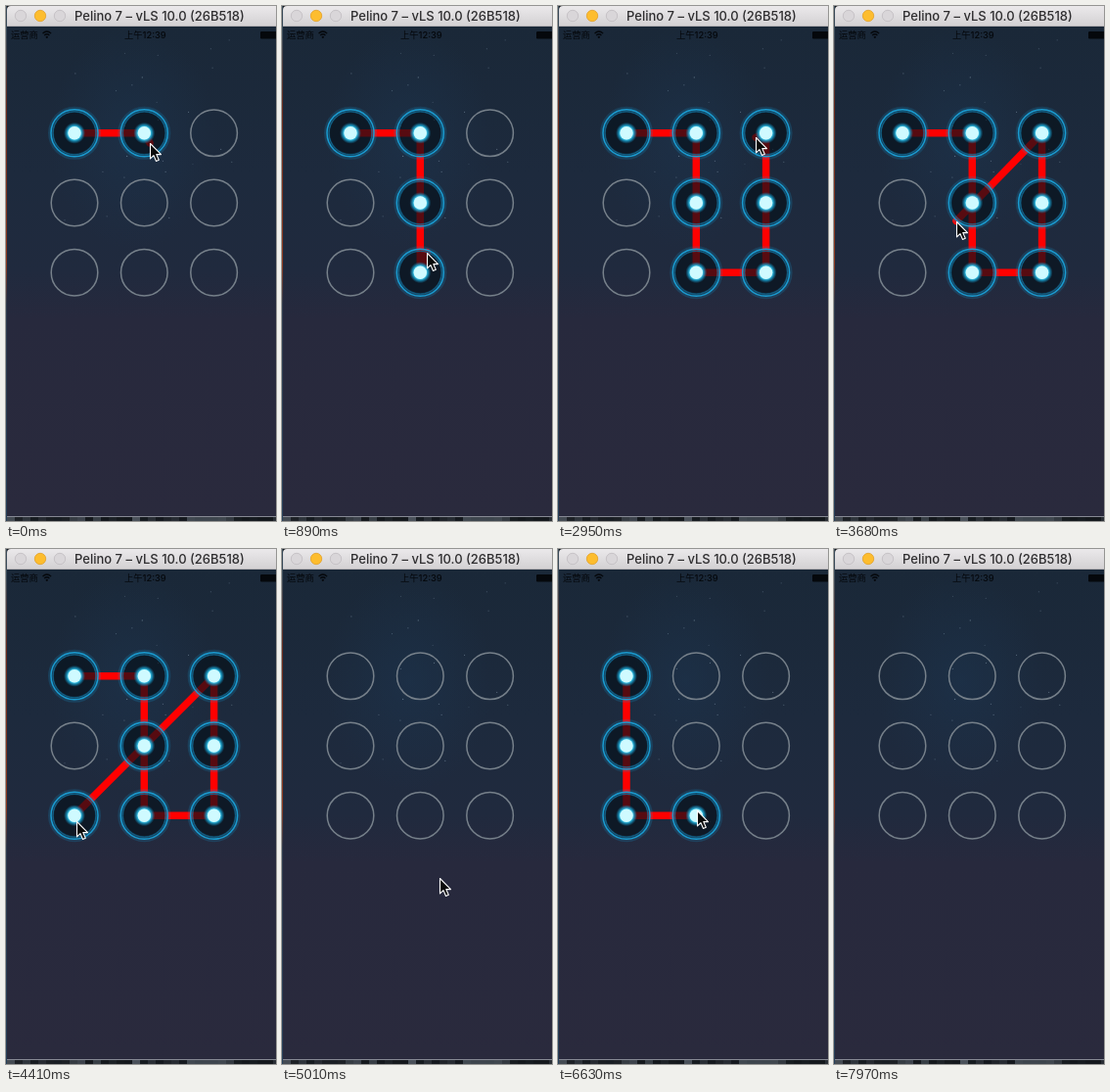
An HTML page that plays this animation: 276x526 px, repeating every 8520 ms.

```html
<!DOCTYPE html>
<html lang="zh">
<head>
<meta charset="utf-8">
<title>Pattern lock</title>
<style>
  html, body { margin: 0; width: 100%; height: 100%; overflow: hidden; background: #2a2a3d; }
  svg { display: block; width: 100%; height: 100%; }
  .title { font: 500 13px Inter, sans-serif; fill: #2e2d2f; }
  .status { font: 500 9.3px Inter, "Noto Sans CJK SC", "Noto Sans CJK", sans-serif; fill: #05080c; }
  .idle { fill: none; stroke: #76808a; stroke-width: 1.5; }
  .trail { fill: none; stroke: #f00; stroke-width: 7.5; stroke-linecap: round; stroke-linejoin: round; }
</style>
</head>
<body>
<svg viewBox="0 0 276 526" preserveAspectRatio="none">
  <defs>
    <linearGradient id="sky" x2="0" y2="1">
      <stop offset="0" stop-color="#1a2838"/>
      <stop offset=".3" stop-color="#1d2a3d"/>
      <stop offset=".5" stop-color="#202a3e"/>
      <stop offset=".6" stop-color="#27293d"/>
      <stop offset="1" stop-color="#2a2a3d"/>
    </linearGradient>
    <radialGradient id="haze">
      <stop offset="0" stop-color="#1c344e" stop-opacity=".55"/>
      <stop offset="1" stop-color="#1c344e" stop-opacity="0"/>
    </radialGradient>
    <linearGradient id="bar" x2="0" y2="1">
      <stop offset="0" stop-color="#ebe9eb"/>
      <stop offset="1" stop-color="#d2d0d2"/>
    </linearGradient>
    <linearGradient id="desk" x2="0" y2="1">
      <stop offset=".05" stop-color="#3a4c5a"/>
      <stop offset=".2" stop-color="#6a2a1c"/>
      <stop offset=".5" stop-color="#8e3a20"/>
      <stop offset=".58" stop-color="#2f3c4e"/>
      <stop offset="1" stop-color="#26405a"/>
    </linearGradient>
    <radialGradient id="glow">
      <stop offset=".58" stop-color="#45d4f6"/>
      <stop offset=".75" stop-color="#1a9fcc" stop-opacity=".75"/>
      <stop offset="1" stop-color="#1080b0" stop-opacity="0"/>
    </radialGradient>
    <g id="lit">
      <circle r="24" fill="#0b2a3c" fill-opacity=".4"/>
      <circle r="21.2" fill="#03060a" fill-opacity=".45"/>
      <circle r="24" fill="none" stroke="#128fc4" stroke-width="6" stroke-opacity=".22"/>
      <circle r="22" fill="none" stroke="#10648a"/>
      <circle r="24" fill="none" stroke="#1a9bd0" stroke-width="1.5"/>
      <circle r="11" fill="url(#glow)"/>
      <circle r="6.7" fill="#cffaff"/>
    </g>
  </defs>

  <rect width="276" height="526" fill="#14181d"/>
  <rect width="1" height="526" fill="url(#desk)"/>
  <rect x="1" y="21" width="275" height="500" fill="url(#sky)"/>
  <ellipse cx="130" cy="135" rx="85" ry="114" fill="url(#haze)"/>
  <g id="stars" fill="#8fa5b8"></g>
  <rect x="1" y="521" width="275" height="1" fill="#868994"/>
  <g id="desktop" fill="#59616b"></g>

  <path d="M1 21V4Q1 0 5 0H276V21Z" fill="url(#bar)"/>
  <rect x="1" y="20" width="275" height="1" fill="#b2b0b3"/>
  <g stroke-width=".8" fill="#d9d6d9" stroke="#c0bdc0">
    <circle cx="15" cy="10" r="5.7"/>
    <circle cx="35" cy="10" r="5.7" fill="#fdbd2e" stroke="#e2a129"/>
    <circle cx="55" cy="10" r="5.7"/>
  </g>
  <text class="title" x="70" y="15">Pelino 7 – vLS 10.0 (26B518)</text>

  <text class="status" x="5" y="33">运营商</text>
  <g fill="none" stroke="#05080c" stroke-width="1.3">
    <path d="M37.5 28Q41.8 24 46.1 28M39.2 30Q41.8 27.6 44.4 30"/>
    <circle cx="41.8" cy="31.8" r=".5"/>
  </g>
  <text class="status" x="121" y="33">上午12:39</text>
  <rect x="260" y="26" width="18" height="7.5" rx="1.2" fill="#05080c"/>

  <path id="trail" class="trail"/>
  <g id="nodes"></g>
  <path id="pointer" d="M.5 .5V15.9L4 12.6L6.5 18.5L9.3 17.3L6.8 11.6H11.5Z"
        fill="#0a0a0a" stroke="#fff" stroke-width="1.1" stroke-linejoin="round"/>
</svg>

<script>
const LOOP = 8520, STEP = 147, HIT = 24;
const byId = id => document.getElementById(id);
const cell = (col, row) => ({ x: 70 + 71.3 * col, y: 129.8 + 71.2 * row });
const ease = k => k * k * (3 - 2 * k);

let seed = 7;
const random = () => (seed = seed * 16807 % 2147483647) / 2147483647;

function add(parent, tag, attrs) {
  const el = document.createElementNS('http://www.w3.org/2000/svg', tag);
  for (const key in attrs) el.setAttribute(key, attrs[key]);
  return parent.appendChild(el);
}

for (let i = 0; i < 24; i++) {
  add(byId('stars'), 'circle', {
    cx: 60 + 185 * random(), cy: 30 + 210 * random() ** 1.3, r: .6, opacity: .2 + .4 * random()
  });
}
for (let x = 1; x < 276; x += 8) {
  add(byId('desktop'), 'rect', { x, y: 522, width: 8, height: 4, opacity: .8 * random() ** 2 });
}

const nodes = Array.from({ length: 9 }, (_, i) => {
  const { x, y } = cell(i % 3, Math.floor(i / 3));
  return {
    x, y,
    idle: add(byId('nodes'), 'circle', { class: 'idle', cx: x, cy: y, r: 23.8 }),
    lit: add(byId('nodes'), 'use', { href: '#lit', x, y })
  };
});

// Pointer turning points as [step, column, row] in units of the node grid.
const gestures = [
  { start: 0, chain: [0],
    keys: [[0, 1.08, .14], [8, 1.1, 2], [13, 2.1, 2.05], [18, 2, -.1], [30, .03, 2.08]] },
  { start: 5010, keys: [[0, 1.28, 2.9], [1, 1.54, 3.15]] },
  { start: 5600, chain: [],
    keys: [[0, .03, .02], [4, .04, 1.95], [7, 1.01, 1.93], [9, 2, 1.95]] },
  { start: 7370, keys: [[0, 2.82, 4.37], [4, 2.95, 4.5]] }
];

function pointerAt(keys, step) {
  const next = keys.findIndex(key => key[0] > step);
  if (next < 0) return cell(...keys.at(-1).slice(1));
  const [s0, c0, r0] = keys[next - 1], [s1, c1, r1] = keys[next];
  const k = ease((step - s0) / (s1 - s0));
  return cell(c0 + (c1 - c0) * k, r0 + (r1 - r0) * k);
}

// Nodes touched by the pointer up to the given step, in order.
function chainAt({ chain, keys }, step) {
  if (!chain) return [];
  const picked = new Set(chain);
  for (let s = 0; s <= step; s++) {
    const { x, y } = pointerAt(keys, s);
    const hit = nodes.findIndex(n => Math.hypot(n.x - x, n.y - y) < HIT);
    if (hit >= 0) picked.add(hit);
  }
  return [...picked];
}

function render() {
  const time = performance.now() % LOOP;
  const gesture = gestures.findLast(g => g.start <= time);
  const step = Math.min(Math.floor((time - gesture.start) / STEP), gesture.keys.at(-1)[0]);
  const pointer = pointerAt(gesture.keys, step);
  const chain = chainAt(gesture, step);
  const points = [...chain.map(i => nodes[i]), pointer];

  byId('trail').setAttribute('d', chain.length ? 'M' + points.map(p => `${p.x} ${p.y}`).join('L') : '');
  byId('pointer').setAttribute('transform', `translate(${Math.round(pointer.x)} ${Math.round(pointer.y)})`);
  nodes.forEach((node, i) => {
    const on = chain.includes(i);
    node.lit.style.display = on ? '' : 'none';
    node.idle.style.display = on ? 'none' : '';
  });
  requestAnimationFrame(render);
}
render();
</script>
</body>
</html>
```
